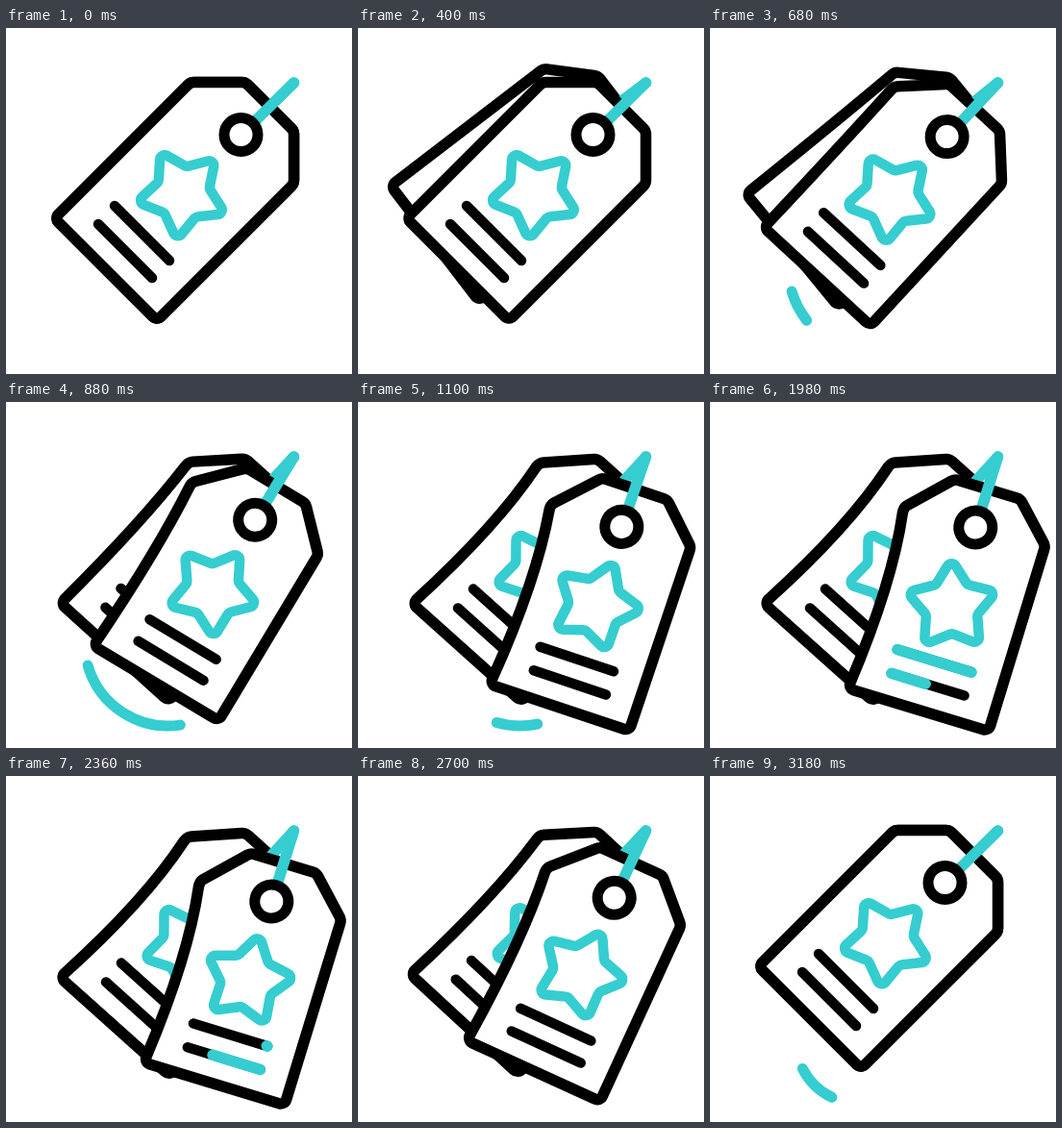
These frames come from a looping animation (360 by 360 pixels, 3200 ms). An HTML page with a canvas:

```html
<!DOCTYPE html>
<html>
<head>
<meta charset="utf-8">
<style>
  html, body { margin: 0; width: 100%; height: 100%; overflow: hidden; background: #fff; }
  canvas { display: block; }
</style>
</head>
<body>
<canvas id="stage" width="360" height="360"></canvas>
<script>
const ctx = document.getElementById('stage').getContext('2d');
const LOOP = 3200, INK = '#000', CYAN = '#35cdd0', RAD = Math.PI / 180;
const PIVOT = [299.5, 57];
const LINES = [[113, 185, 170, 242], [96, 204, 152, 260]];

// Sine ease-in-out progress between two times
function ease(t, from, to) {
  const p = Math.min(1, Math.max(0, (t - from) / (to - from)));
  return (1 - Math.cos(p * Math.PI)) / 2;
}

function stroke(color, width) {
  ctx.strokeStyle = color;
  ctx.lineWidth = width;
  ctx.stroke();
}

function line([x1, y1, x2, y2], color, width, from = 0, to = 1) {
  if (to <= from) return;
  const dx = x2 - x1, dy = y2 - y1;
  ctx.beginPath();
  ctx.moveTo(x1 + dx * from, y1 + dy * from);
  ctx.lineTo(x1 + dx * to, y1 + dy * to);
  stroke(color, width);
}

function arc(x, y, r, from, to, color, width) {
  ctx.beginPath();
  ctx.arc(x, y, r, from * RAD, to * RAD, true);
  stroke(color, width);
}

function star(spin) {
  const at = (r, deg) => [184 + r * Math.cos(deg * RAD), 172 + r * Math.sin(deg * RAD)];
  ctx.beginPath();
  // Start halfway up one side so every corner can be rounded
  const [ax, ay] = at(28, spin - 10.5), [bx, by] = at(49, spin + 25.5);
  ctx.moveTo((ax + bx) / 2, (ay + by) / 2);
  for (let i = 0; i < 5; i++) {
    const a = 25.5 + spin + i * 72;
    ctx.arcTo(...at(49, a), ...at(28, a + 36), 5);
    ctx.arcTo(...at(28, a + 36), ...at(49, a + 72), 5);
  }
  ctx.closePath();
  stroke(CYAN, 10.5);
}

function body(bend) {
  const x = 192 - 3 * bend, y = 56.5 + bend;
  const left = 50.5 - 1.5 * bend, low = 198 - bend;
  ctx.beginPath();
  ctx.moveTo(x - 4, y + 4);
  ctx.arcTo(x, y, 249, 56.5, 9);
  ctx.arcTo(249, 56.5, 299.5, 107, 9);
  ctx.arcTo(299.5, 107, 299.5, 162, 9);
  ctx.arcTo(299.5, 162, 157, 304.5, 9);
  ctx.arcTo(157, 304.5, left, low, 6);
  ctx.arcTo(left, low, left + 5, low - 5, 6);
  // The long left edge bows inward as the tag swings
  ctx.quadraticCurveTo(x - 56 + 8 * bend, y + 56 + 8 * bend, x - 4, y + 4);
  ctx.closePath();
  ctx.fillStyle = '#fff';
  ctx.fill();
  stroke(INK, 11.5);
}

function tag(angle, bend, spin, fills) {
  ctx.save();
  ctx.translate(...PIVOT);
  ctx.rotate(angle * RAD);
  ctx.translate(-PIVOT[0], -PIVOT[1]);
  body(bend);
  star(spin);
  LINES.forEach((l, i) => {
    line(l, INK, 10.5);
    line(l, CYAN, 11.5, ...fills[i]);
  });
  line([...PIVOT, 259, 97], CYAN, 11.5);
  arc(244.5, 111, 17.5, 360, 0, INK, 11);
  ctx.restore();
}

function draw(t) {
  ctx.fillStyle = '#fff';
  ctx.fillRect(0, 0, 360, 360);
  ctx.lineCap = ctx.lineJoin = 'round';

  const home = 1 - ease(t, 2565, 2950);
  const swing = ease(t, 565, 1195) * home;
  const lag = ease(t, 510, 910);
  const backAngle = (11 * ease(t, 220, 510) - 14 * lag) * home;
  const spin = 6 * lag * home + 360 * ease(t, 1460, 2450);
  const fills = [
    [ease(t, 2080, 2380), ease(t, 1580, 1900)],
    [ease(t, 2240, 2540), ease(t, 1810, 2165)]
  ];

  // Motion trails of the two swings
  if (t > 570 && t < 1230) {
    arc(168.7, 250, 87, 164 - 86 * ease(t, 880, 1240), 164 - 86 * ease(t, 550, 930), CYAN, 11);
  }
  if (t > 2760) {
    const head = 60 + 93 * ease(t, 2740, 3120), tail = 60 + 93 * ease(t, 2960, 3350);
    arc(156, 274, 67, head, tail, CYAN, 11);
  }

  tag(backAngle, swing, 0, [[0, 0], [0, 0]]);
  tag(-28 * swing, swing, spin, fills);
}

let start;
function frame(now) {
  start ??= now;
  draw((now - start) % LOOP);
  requestAnimationFrame(frame);
}
requestAnimationFrame(frame);
</script>
</body>
</html>
```
